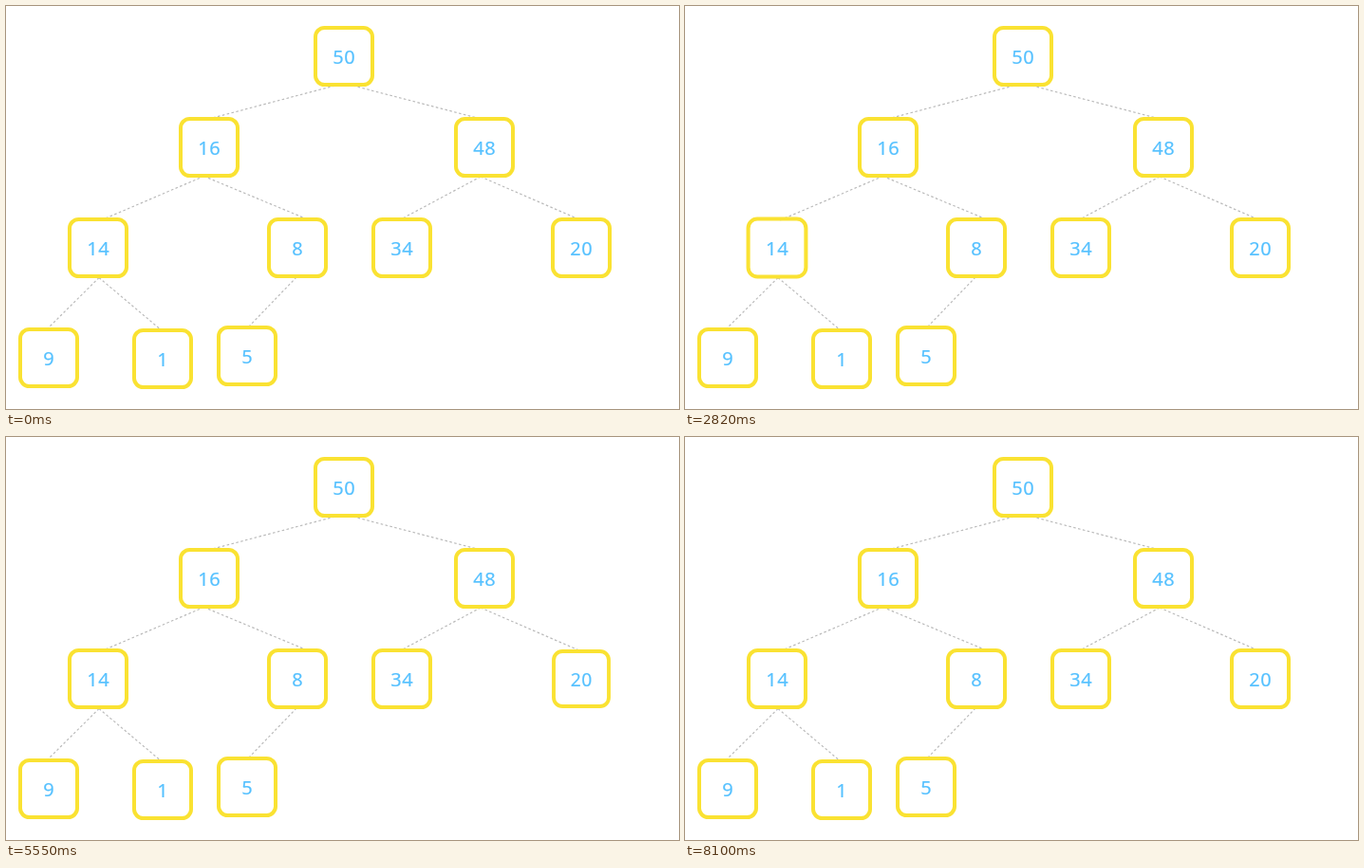
These frames come from a looping animation (709x425 px, 8490 ms). An HTML page:

```html
<!DOCTYPE html>
<html lang="en">
<head>
<meta charset="utf-8">
<title>Heap level-order traversal</title>
<style>
  html, body { margin: 0; width: 100%; height: 100%; overflow: hidden; background: #fff; }
  svg { display: block; }
  line { stroke: #bbb; stroke-width: 1.2; stroke-dasharray: 2.6 2.4; }
  rect { fill: none; stroke: #fae232; stroke-width: 4; }
  text {
    fill: #56c1ff; stroke: #56c1ff; stroke-width: 0.2; letter-spacing: 0.6px;
    font: 20px "Noto Sans", "Open Sans", sans-serif; text-anchor: middle;
  }
</style>
</head>
<body>
<svg id="stage" width="709" height="425" viewBox="0 0 709 425"></svg>
<script>
const LOOP = 8490, FIRST = 390, GAP = 810, TICK = 30, STEPS = 15;
const PEAK = 1.2, DIP = 0.95;

// Heap order. entry: x where the line from the parent arrives; exit: where lines to children start.
const nodes = [
  { value: 50, x: 356, y: 53, exit: [356, 81.5] },
  { value: 16, x: 214, y: 149, entry: 210, exit: [208.5, 179.5] },
  { value: 48, x: 504, y: 149, exit: [500, 180] },
  { value: 14, x: 97, y: 255, entry: 100, exit: [98, 286.5] },
  { value: 8, x: 307, y: 255, entry: 320, exit: [306, 286] },
  { value: 34, x: 417, y: 255, entry: 414 },
  { value: 20, x: 606, y: 255 },
  { value: 9, x: 45, y: 371, entry: 42 },
  { value: 1, x: 165, y: 372 },
  { value: 5, x: 254, y: 369 }
];

const stage = document.getElementById("stage");

function add(parent, tag, attrs) {
  const el = document.createElementNS("http://www.w3.org/2000/svg", tag);
  for (const name in attrs) el.setAttribute(name, attrs[name]);
  return parent.appendChild(el);
}

function ease(from, to, p) {
  return from + (to - from) * (1 - Math.cos(Math.PI * p)) / 2;
}

// Swell, overshoot below normal size, then settle.
function pulse(p) {
  if (p <= 0 || p >= 1) return 1;
  if (p < 0.4) return ease(1, PEAK, p / 0.4);
  if (p < 0.8) return ease(PEAK, DIP, (p - 0.4) / 0.4);
  return ease(DIP, 1, (p - 0.8) / 0.2);
}

nodes.slice(1).forEach(({ x, y, entry = x }, i) => {
  const [x1, y1] = nodes[i >> 1].exit;
  add(stage, "line", { x1, y1, x2: entry, y2: y - 29 });
});

for (const node of nodes) {
  node.group = add(stage, "g", {});
  add(node.group, "rect", { x: -30, y: -30, width: 60, height: 60, rx: 9.5 });
  add(node.group, "text", { x: 0.3, y: 8 }).textContent = node.value;
}

function draw() {
  const time = performance.now() % LOOP;
  nodes.forEach(({ x, y, group }, i) => {
    const step = Math.floor((time - FIRST - i * GAP) / TICK) + 1;
    group.setAttribute("transform", `translate(${x} ${y}) scale(${pulse(step / STEPS)})`);
  });
  requestAnimationFrame(draw);
}
draw();
</script>
</body>
</html>
```
